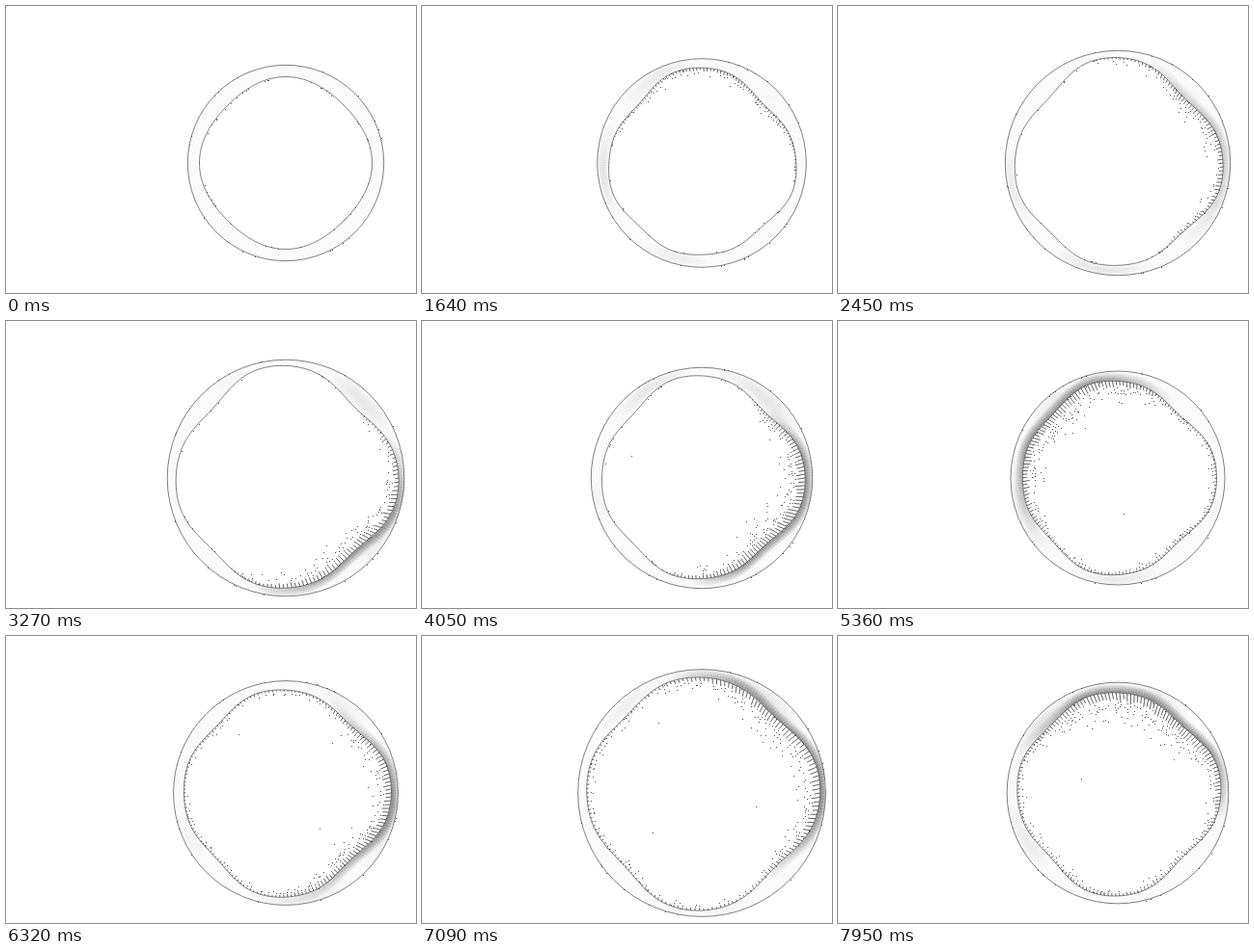
Recreate the animation shown at these times as an HTML page with a canvas. Size 425 by 298 pixels, loop 8 s.

```html
<!DOCTYPE html>
<html lang="en">
<head>
<meta charset="utf-8">
<title>Pulsing ring</title>
<style>
html, body { margin: 0; width: 100%; height: 100%; overflow: hidden; background: #fff; }
canvas { display: block; width: 425px; height: 298px; }
</style>
</head>
<body>
<canvas id="stage" width="425" height="298"></canvas>
<script>
const ctx = document.getElementById('stage').getContext('2d');
const CX = 290, CY = 163, TAU = Math.PI * 2, LOOP = 8000, STEPS = 240, SPOKES = 170;

// Outer radius: time, value
const PULSE = [[0, 101.7], [1640, 108.3], [3290, 122.8], [4080, 114.7], [4600, 122],
  [5360, 111], [5580, 132.5], [6400, 116], [7000, 131], [7300, 119], [7620, 133], [8000, 114]];

// Bristles: time, direction in degrees, extra length there, length everywhere
const GUSTS = [[0, -80, 0, 0.5], [1640, -80, 5, 2], [3270, 40, 16, 0], [4050, 25, 19, 1],
  [5360, -135, 12, 5], [6320, 10, 12, 4], [7950, -70, 14, 6]];

const { min, max, sin, cos, round, floor } = Math;
const mix = (a, b, u) => a + (b - a) * u;

function random(seed) {
  return () => {
    seed = (seed + 0x6D2B79F5) | 0;
    let x = Math.imul(seed ^ (seed >>> 15), 1 | seed);
    x ^= x + Math.imul(x ^ (x >>> 7), 61 | x);
    return ((x ^ (x >>> 14)) >>> 0) / 4294967296;
  };
}

function segment(keys, t) {
  let i = 0;
  while (i < keys.length - 2 && t > keys[i + 1][0]) i++;
  return i;
}

// Flat at every peak and trough
function slope(i) {
  const p = PULSE[i - 1], c = PULSE[i], n = PULSE[i + 1];
  if (!p || !n || (c[1] - p[1]) * (n[1] - c[1]) <= 0) return 0;
  return (n[1] - p[1]) / (n[0] - p[0]);
}

function pulse(t) {
  const i = segment(PULSE, t), [t0, a] = PULSE[i], [t1, b] = PULSE[i + 1];
  const d = t1 - t0, u = (t - t0) / d, v = 1 - u;
  return mix(a, b, u * u * (3 - 2 * u)) + d * u * v * (slope(i) * v - slope(i + 1) * u);
}

function gust(t) {
  const i = segment(GUSTS, t), a = GUSTS[i], b = GUSTS[i + 1];
  const u = min(1, (t - a[0]) / (b[0] - a[0]));
  const [, degrees, lobe, base] = a.map((v, k) => mix(v, b[k], u));
  return angle => base + lobe * max(0, cos(angle - degrees * TAU / 360));
}

// Four thick corners that sharpen as the ring grows, plus a drifting three-fold wave
function innerEdge(t, R) {
  const grow = min(20, R - 101.7), wake = min(1, t / 1600);
  return a => R - max(4, 14.5 - 0.13 * grow - (2.3 + 0.16 * grow) * cos(4 * a)
    + wake * (cos(8 * a) + 2 * cos(3 * a - 4.8 + 0.00031 * t)));
}

const point = (a, r) => [CX + r * cos(a), CY + r * sin(a)];

function dot(a, r) {
  const [x, y] = point(a, r);
  ctx.fillRect(round(x), round(y), 1, 1);
}

function line(a0, r0, a1, r1) {
  ctx.beginPath();
  ctx.moveTo(...point(a0, r0));
  ctx.lineTo(...point(a1, r1));
  ctx.stroke();
}

function each(count, draw) {
  for (let i = 0; i < count; i++) draw(i / count * TAU);
}

function shade(t, R, inner, hair) {
  const wake = min(1, t / 1600);
  each(STEPS, a => {
    const r = inner(a), b = a + TAU / STEPS * 1.1;
    const dark = min(1, max(0, (hair(a) - 7) / 9));
    const haze = 0.1 * wake * max(0, sin(3 * a + t / 900) * sin(2 * a - t / 1300));
    ctx.lineWidth = 1.7;
    for (let q = 0.8; q < R - r; q += 1.6) {
      const depth = q / (R - r);
      const alpha = haze * sin(depth * Math.PI) + 0.6 * dark * max(0, 1 - q / 9);
      ctx.strokeStyle = `rgba(70,70,70,${alpha})`;
      line(a, r + q, b, r + q);
    }
  });
}

function bristles(t, R, inner, hair) {
  const rnd = random(floor(t / 45) + 7);
  ctx.fillStyle = ctx.strokeStyle = '#505050';
  ctx.lineWidth = 0.9;
  each(SPOKES, a => {
    const r = inner(a), h = hair(a), solid = h * mix(0.3, 0.55, rnd());
    if (h > 2) line(a, r, a + solid * 0.0015, r - solid);
    for (let d = solid + 2; d < h; d += 3) {
      if (rnd() < 0.4) dot(a + d * 0.0015, r - d);
    }
    if (rnd() < h / 30) dot(a, r - h * (0.7 + rnd()));
  });
  // Grain on both outlines, mostly at the corners
  for (let i = 0; i < 60; i++) {
    const a = TAU * (floor(rnd() * 4) / 4 + 0.125) + (rnd() - 0.5) * 1.2;
    if (i % 3) dot(a, inner(a) - rnd());
    else dot(a, R + rnd() * 0.6);
  }
  for (let i = 0; i < t / 1200 - 3; i++) dot(rnd() * TAU, R * mix(0.3, 0.7, rnd()));
}

function draw(t) {
  const R = pulse(t), inner = innerEdge(t, R), hair = gust(t);
  ctx.fillStyle = '#fff';
  ctx.fillRect(0, 0, 425, 298);

  const edge = new Path2D();
  each(STEPS, a => edge.lineTo(...point(a, inner(a))));
  edge.closePath();
  const rim = new Path2D();
  rim.arc(CX, CY, R, 0, TAU);
  const ring = new Path2D(edge);
  ring.addPath(rim);

  ctx.fillStyle = '#fafafa';
  ctx.fill(ring, 'evenodd');
  shade(t, R, inner, hair);

  ctx.strokeStyle = '#606060';
  ctx.lineWidth = 0.8;
  ctx.stroke(edge);
  ctx.stroke(rim);
  bristles(t, R, inner, hair);
}

const start = performance.now();
function tick(now) {
  draw(max(0, now - start) % LOOP);
  requestAnimationFrame(tick);
}
draw(0);
requestAnimationFrame(tick);
</script>
</body>
</html>
```
